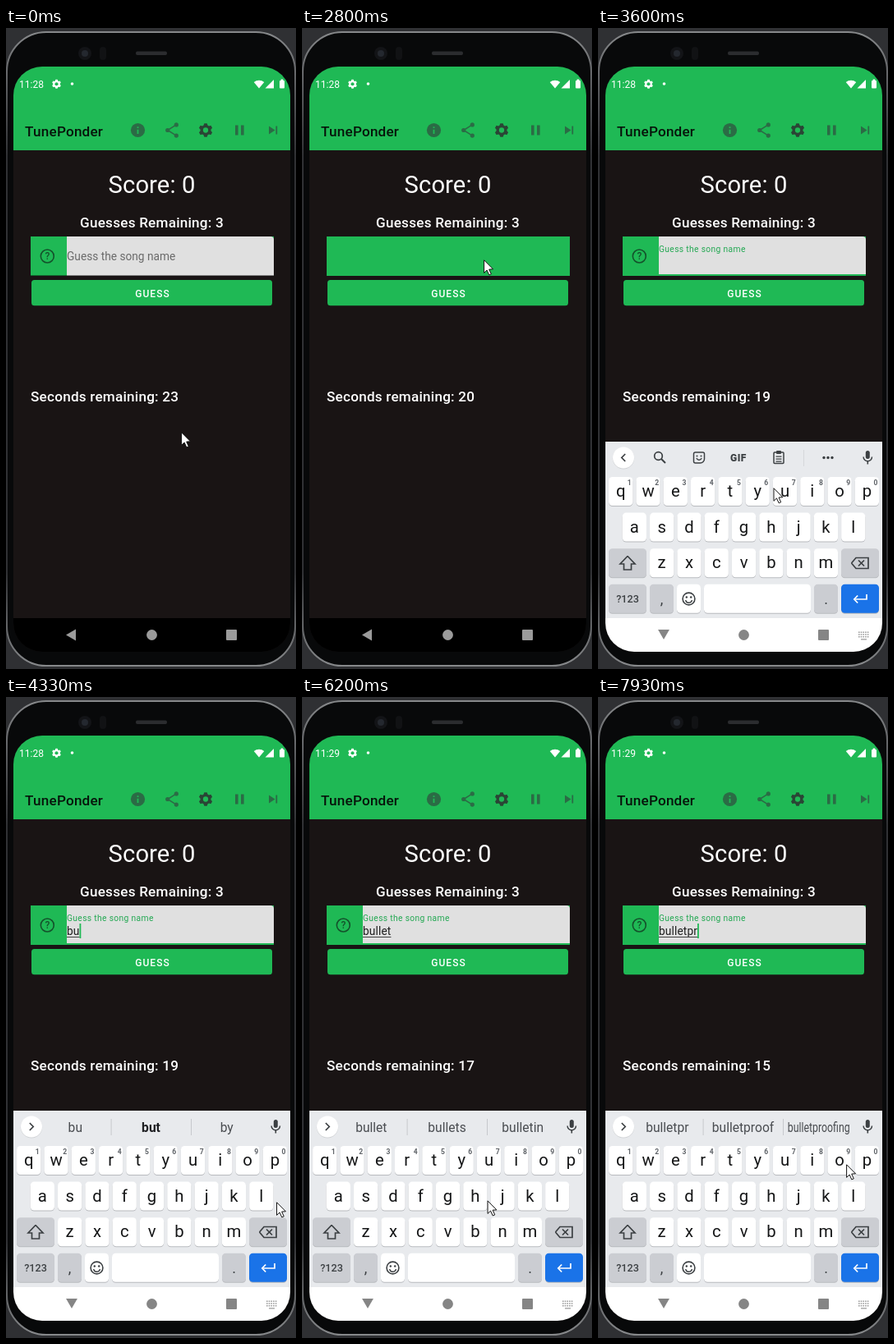
An HTML page with a canvas for the animation above (8 s loop, 353x781 px).

```html
<!DOCTYPE html>
<html lang="en">
<head>
<meta charset="utf-8">
<title>Song guessing game</title>
<style>
html, body { margin: 0; width: 100%; height: 100%; overflow: hidden; background: #333437; }
canvas { display: block; width: 353px; height: 781px; }
</style>
</head>
<body>
<canvas id="stage"></canvas>
<script>
const W = 353, H = 781, LOOP = 8000, FPS = 15;
const GREEN = '#1fb955', DARK = '#191414', INK = '#2b6b45', GREY = '#3c4043';
const ROWS = ['qwertyuiop', 'asdfghjkl', 'zxcvbnm'];
const PITCH = 33.3, ROW_H = 43.6, KEY_H = 35, KEY_TOP = 547;
const TAP = 2470, FOCUS = 2900, RISE = 2942;

const canvas = document.getElementById('stage');
const ctx = canvas.getContext('2d');
const dpr = window.devicePixelRatio || 1;
canvas.width = W * dpr;
canvas.height = H * dpr;

// Pointer moves: start, duration, goal (a point or the key to press)
const MOVES = [
  [0, 267, [190, 369]], [667, 200, [190, 371]], [1070, 460, [205, 437]],
  [1740, 220, [225, 345]], [1960, 170, [217, 286]], [2430, 270, [221, 282]],
  [3330, 400, 'b'], [3870, 200, 'u'], [4200, 130, [329, 615]], [4330, 140, 'l'],
  [4780, 350, 'e'], [5260, 230, 't'], [5620, 250, [150, 649]], [5930, 600, 'p'],
  [6820, 110, [293, 582]], [6930, 440, 'r'], [7470, 200, [256, 581]], [7690, 240, [302, 569]]
];

const WORD = 'bulletpr';
const STROKES = [3870, 4190, 4520, 4780, 5240, 5600, 6860, 7470];
// Two suggestions after each stroke; a star marks the autocorrection
const HINTS = ['*be by', '*but by', '*bulk bull', 'bulls bullet', '*bullet bulletin',
  'bullets bulletin', 'bulletproof bulletproofing', 'bulletproof bulletproofing'];

const clamp = v => Math.max(0, Math.min(1, v));
const smooth = p => p * p * (3 - 2 * p);
const rowLeft = r => 27.7 + [0, .5, 1.5][r] * PITCH;
const rowTop = r => KEY_TOP + r * ROW_H;

function spot(goal) {
  if (typeof goal !== 'string') return goal;
  const r = ROWS.findIndex(row => row.includes(goal));
  return [rowLeft(r) + ROWS[r].indexOf(goal) * PITCH, rowTop(r) + KEY_H / 2];
}

function rect(x, y, w, h, r, fill) {
  ctx.beginPath();
  ctx.roundRect(x, y, w, h, r);
  ctx.fillStyle = fill;
  ctx.fill();
}

function frameRect(x, y, w, h, r, color, width = 1.5) {
  ctx.beginPath();
  ctx.roundRect(x, y, w, h, r);
  ctx.strokeStyle = color;
  ctx.lineWidth = width;
  ctx.stroke();
}

function disc(x, y, r, fill) {
  ctx.beginPath();
  ctx.arc(x, y, r, 0, Math.PI * 2);
  ctx.fillStyle = fill;
  ctx.fill();
}

function arc(x, y, r, color, width = 1.5, from = 0, to = Math.PI * 2) {
  ctx.beginPath();
  ctx.arc(x, y, r, from, to);
  ctx.strokeStyle = color;
  ctx.lineWidth = width;
  ctx.stroke();
}

function shape(points, fill) {
  ctx.beginPath();
  points.forEach(([x, y]) => ctx.lineTo(x, y));
  ctx.closePath();
  ctx.fillStyle = fill;
  ctx.fill();
}

function line(points, color, width = 1.5) {
  ctx.beginPath();
  points.forEach(([x, y]) => ctx.lineTo(x, y));
  ctx.strokeStyle = color;
  ctx.lineWidth = width;
  ctx.stroke();
}

// Arrow head open to the other side; dir is -1 for left, 1 for right
const chevron = (x, y, dir, color) =>
  line([-1, 0, 1].map(k => [x + dir * (k ? -2.2 : 2.2), y + k * 4.5]), color, 1.7);

function text(str, x, y, size, color, { weight = 400, align = 'left', spacing = 0 } = {}) {
  ctx.font = `${weight} ${size}px Roboto, sans-serif`;
  ctx.letterSpacing = spacing + 'px';
  ctx.textAlign = align;
  ctx.fillStyle = color;
  ctx.fillText(str, x, y);
}

function gear(x, y, r, color, hole) {
  const pts = [];
  for (let i = 0; i < 24; i++) {
    const corner = i % 4, outer = corner === 1 || corner === 2;
    const a = Math.floor(i / 4) * Math.PI / 3 + (corner < 2 ? -1 : 1) * (outer ? .2 : .39);
    const d = r * (outer ? 1 : .76);
    pts.push([x + Math.sin(a) * d, y - Math.cos(a) * d]);
  }
  shape(pts, color);
  disc(x, y, r * .37, hole);
}

function body() {
  rect(0, 0, W, H, 0, '#2f3033');
  const edge = ctx.createLinearGradient(0, 0, 0, H);
  [[0, '#8a8c8e'], [.09, '#5c5d60'], [.2, '#303134'], [.85, '#303134'], [1, '#8a8c8e']]
    .forEach(([at, color]) => edge.addColorStop(at, color));
  rect(1, 5, W - 2, 772, 48, '#08090a');
  frameRect(1, 5, W - 2, 772, 48, edge, 2);
  disc(96, 31, 8, '#131417');
  disc(96, 31, 4, '#24282f');
  rect(114, 23, 8, 16, 4, '#111214');
  rect(158, 28.5, 38, 4.5, 2, '#2b2c2f');
}

function statusBar(t) {
  text(t < 4530 ? '11:28' : '11:29', 16, 73, 12, '#fff');
  gear(61.5, 68.3, 5.6, '#fff', GREEN);
  disc(80.5, 68, 1.8, '#fff');
  ctx.beginPath();
  ctx.moveTo(308, 73.5);
  ctx.arc(308, 73.5, 9.8, -Math.PI * .72, -Math.PI * .28);
  ctx.fillStyle = '#fff';
  ctx.fill();
  shape([[326, 63], [326, 73.5], [315.5, 73.5]], '#fff');
  rect(333, 64, 6, 9.5, 1, '#fff');
  rect(334.6, 62.6, 2.8, 2, 0, '#fff');
}

function appBar() {
  text('TunePonder', 23, 131.5, 17.14, '#07140b', { weight: 500, spacing: .2 });
  disc(160.5, 124.5, 8.6, INK);
  rect(159.6, 123.7, 1.8, 5.2, 0, GREEN);
  rect(159.6, 120.2, 1.8, 1.8, 0, GREEN);
  const nodes = [-1, 0, 1].map(k => [k ? 207.3 : 196.7, 124.5 + k * 6.6]);
  line(nodes, INK, 1.6);
  nodes.forEach(([x, y]) => disc(x, y, 2.6, INK));
  gear(243, 124.5, 8.5, '#2a4535', GREEN);
  rect(279, 118.5, 3.6, 12, 0, INK);
  rect(286, 118.5, 3.6, 12, 0, INK);
  shape([[320, 119.4], [327.5, 124.5], [320, 129.6]], INK);
  rect(328.4, 119.4, 1.8, 10.2, 0, INK);
}

function field(t, typed) {
  rect(30, 254, 296, 48, 0, GREEN);
  rect(74, 254, 252, 48, [0, 4, 0, 0], '#e0e0e0');
  arc(50.3, 278, 8, '#14522b', 1.6);
  text('?', 50.3, 282.3, 12, '#14522b', { weight: 500, align: 'center' });
  if (t >= FOCUS) {
    rect(30, 300, 296, 2, 0, GREEN);
    text('Guess the song name', 74, 272.7, 10.29, '#24a853', { spacing: .34 });
    const str = WORD.slice(0, typed);
    text(str, 74, 290, 13.71, '#202020', { spacing: .13 });
    const w = ctx.measureText(str).width;
    rect(74, 292, w, 1, 0, '#404040');
    const since = t - (typed ? STROKES[typed - 1] : FOCUS);
    if (since % 1000 < 500) rect(74 + w, 276, 1.8, 18, 0, GREEN);
  } else {
    rect(30, 301, 296, 1, 0, 'rgba(0,0,0,.42)');
    text('Guess the song name', 74, 283, 13.71, '#6a6a6a');
  }
  // Touch ripple
  const grow = clamp((t - TAP) / 300), fade = clamp((3500 - t) / 280);
  if (grow > 0 && fade > 0) {
    ctx.save();
    ctx.beginPath();
    ctx.rect(30, 254, 296, 48);
    ctx.clip();
    ctx.globalAlpha = fade;
    disc(221, 282, 200 * smooth(grow), GREEN);
    ctx.restore();
  }
}

function game(t, typed) {
  const bold = { weight: 500, spacing: .22 };
  text('Score: 0', 177.5, 200.5, 29.2, '#fff', { align: 'center', spacing: .1 });
  text('Guesses Remaining: 3', 177.5, 243, 17.14, '#fff', { ...bold, align: 'center' });
  field(t, typed);
  rect(31, 307, 293, 31.3, 3.5, GREEN);
  text('GUESS', 178.5, 327.5, 12, '#fff', { weight: 500, align: 'center', spacing: 1.07 });
  const left = 23 - Math.floor((t + 475) / 1000);
  text('Seconds remaining: ' + left, 30, 455, 17.14, '#fff', bold);
}

function navIcons(down, color) {
  const turn = down ? Math.PI / 2 : Math.PI;
  shape([0, 1, 2].map(i => {
    const a = turn + i * Math.PI * 2 / 3;
    return [(down ? 80 : 81) + Math.cos(a) * 8, (down ? 737 : 739.5) + Math.sin(a) * 8];
  }), color);
  disc(177.5, 739.5, 6.4, color);
  rect(268, 733, 13, 13, 1, color);
}

function toolbar() {
  chevron(31, 523.5, -1, GREY);
  arc(73.5, 521.5, 4.8, GREY, 1.7);
  line([[77, 525], [82, 530]], GREY, 1.9);
  frameRect(116.5, 517, 13, 13, [2, 2, 5, 2], GREY);
  for (const x of [120.5, 125.5]) disc(x, 521.5, 1, GREY);
  arc(123, 523, 3.2, GREY, 1.3, .3, Math.PI - .3);
  text('GIF', 171, 527.5, 12, GREY, { weight: 900, align: 'center', spacing: .5 });
  frameRect(214, 517, 12, 13.5, 1, GREY);
  rect(217, 515, 6, 4, 1, GREY);
  for (let i = 0; i < 3; i++) {
    rect(216.5, 521.5 + 3 * i, 7, 1.2, 0, GREY);
    disc(275 + 5 * i, 523.5, 1.7, GREY);
  }
  rect(250, 514, 1, 20, 0, '#d5d7da');
}

// Long words are condensed to the width of their slot
function suggestion(str, x, weight) {
  const size = 15.6, slot = 76;
  ctx.save();
  ctx.font = `${weight} ${size}px Roboto, sans-serif`;
  ctx.letterSpacing = '0px';
  ctx.translate(x, 529.5);
  ctx.scale(Math.min(1, slot / ctx.measureText(str).width), 1);
  text(str, 0, 0, size, weight > 400 ? '#202124' : '#4a4d51', { weight, align: 'center' });
  ctx.restore();
}

function strip(typed) {
  disc(31, 524.2, 13.2, '#d2d4d7');
  disc(31, 523.5, 13, '#fff');
  rect(325.8, 515, 5, 10, 2.5, GREY);
  arc(328.3, 522.5, 5.2, GREY, 1.5, 0, Math.PI);
  rect(327.5, 527.5, 1.6, 4, 0, GREY);
  if (!typed) return toolbar();
  chevron(31, 523.5, 1, GREY);
  const hint = HINTS[typed - 1], fix = hint[0] === '*';
  const words = [WORD.slice(0, typed), ...hint.replace('*', '').split(' ')];
  words.forEach((s, i) => {
    if (i) rect(30.2 + 97.4 * i, 514, 1, 20, 0, '#c6c8cc');
    suggestion(s, 84.3 + 92.2 * i, fix && i === 1 ? 700 : 400);
  });
}

function key(x, r, w, fill = '#fff') {
  rect(x, rowTop(r) + 1, w, KEY_H, 4.5, '#b8babe');
  rect(x, rowTop(r), w, KEY_H, 4.5, fill);
}

function keyboard(typed) {
  const SIDE = '#cbcdd2', center = { align: 'center' };
  rect(9, 504, 337, 215, 0, '#e8eaed');
  rect(9, 719, 337, 300, 0, '#fff');
  strip(typed);
  ROWS.forEach((row, r) => [...row].forEach((c, i) => {
    const x = rowLeft(r) + PITCH * i, y = rowTop(r);
    key(x - 14.6, r, 29.2);
    text(c, x, y + 24.2, 20.3, '#151617', center);
    if (r === 0) text((i + 1) % 10, x + 10.6, y + 9.8, 8.6, '#5f6368', { weight: 700, ...center });
  }));
  for (const r of [2, 3]) key(13, r, 46, SIDE);
  key(296, 2, 46, SIDE);
  key(296, 3, 46, '#1a73e8');
  for (const x of [63, 263]) key(x, 3, 29, SIDE);
  key(96, 3, 29);
  key(129, 3, 130);

  // Shift, backspace
  const half = [[0, 643.5], [9, 653], [4.5, 653], [4.5, 660]];
  const mirror = half.map(([x, y]) => [-x, y]).reverse();
  line([...half, ...mirror].map(([x, y]) => [36 + x, y]), GREY, 1.7);
  line([[308.5, 652], [314, 645.5], [329, 645.5], [329, 658.5], [314, 658.5], [308.5, 652]], GREY, 1.7);
  for (const d of [-3.5, 3.5]) line([[320.5 - d, 648.5], [320.5 + d, 655.5]], GREY, 1.7);

  text('?123', 36, 700, 12.6, GREY, { weight: 500, ...center });
  text(',', 77.5, 702, 18, GREY, center);
  text('.', 277.5, 702, 18, GREY, center);
  arc(110.5, 695.5, 7.4, GREY, 1.6);
  for (const d of [-2.7, 2.7]) disc(110.5 + d, 693.5, 1.2, GREY);
  arc(110.5, 696.3, 4, GREY, 1.6, .2, Math.PI - .2);
  line([[327, 690], [327, 696], [312, 696]], '#fff', 1.7);
  chevron(314, 696, -1, '#fff');
}

function keyboardIcon() {
  for (let i = 0; i < 15; i++)
    rect(317 + i % 5 * 2.7, 735.5 + Math.floor(i / 5) * 2.7, 1.6, 1.6, 0, '#9a9a9a');
  rect(320, 744.2, 7, 1.4, 0, '#9a9a9a');
}

function pointer(t) {
  let [x, y] = [213, 492];
  for (const [start, span, goal] of MOVES) {
    const p = smooth(clamp((t - start) / span)), [gx, gy] = spot(goal);
    x += (gx - x) * p;
    y += (gy - y) * p;
  }
  ctx.save();
  ctx.translate(x, y);
  shape([[.6, .8], [.6, 16.4], [4.1, 13], [6.8, 18.9], [9.3, 17.8], [6.7, 12.1], [11.5, 11.8]], '#fff');
  ctx.strokeStyle = '#111';
  ctx.lineWidth = 1;
  ctx.stroke();
  ctx.restore();
}

function draw(t) {
  ctx.setTransform(dpr, 0, 0, dpr, 0, 0);
  const typed = STROKES.filter(s => s <= t).length;
  const rise = clamp((t - RISE) / 323);
  body();
  ctx.save();
  ctx.beginPath();
  ctx.roundRect(9, 47, 337, 713, 35);
  ctx.clip();
  rect(9, 47, 337, 713, 0, DARK);
  rect(9, 47, 337, 102, 0, GREEN);
  rect(9, 719, 337, 41, 0, '#000');
  statusBar(t);
  appBar();
  game(t, typed);
  if (rise > 0) {
    ctx.save();
    ctx.translate(0, 256 * (1 - rise) ** 3);
    keyboard(typed);
    // Fade in as one layer
    ctx.globalAlpha = 1 - clamp(rise * 2.2);
    rect(9, 504, 337, 260, 0, DARK);
    ctx.restore();
    keyboardIcon();
  }
  navIcons(rise === 1, rise > 0 ? '#858585' : '#9b9b9b');
  ctx.restore();
  pointer(t);
}

const start = performance.now();
function frame() {
  const t = (performance.now() - start) % LOOP;
  draw(Math.floor((t + 5) * FPS / 1000) * 1000 / FPS);
  requestAnimationFrame(frame);
}
frame();
</script>
</body>
</html>
```
